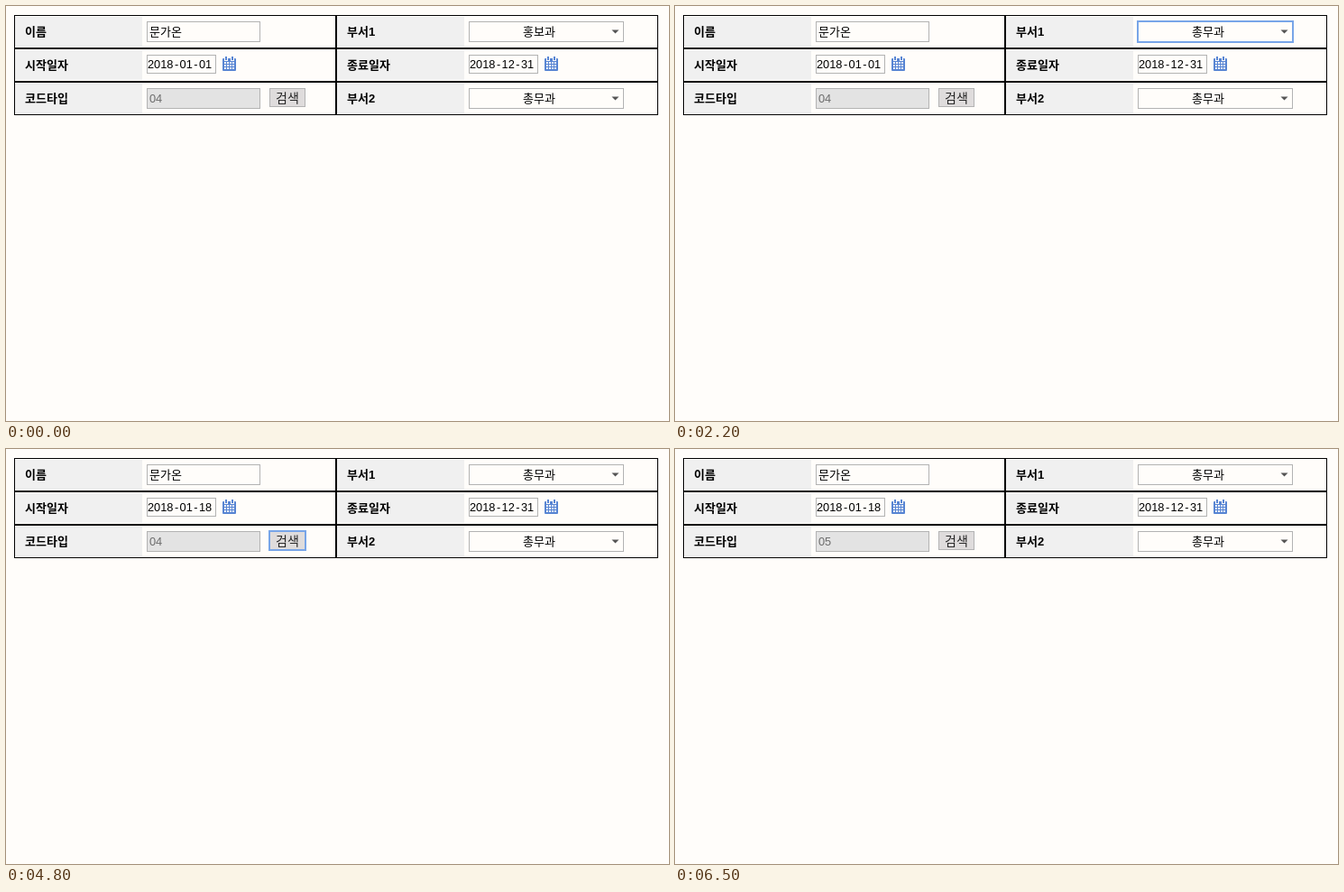
Recreate the animation shown at these times as an HTML page. Size 735x460 px, loop 9.3 s.

```html
<!DOCTYPE html>
<html lang="ko">
<head>
<meta charset="utf-8">
<title>검색 조건</title>
<style>
html, body { margin: 0; width: 100%; height: 100%; overflow: hidden; background: #fffdfa; }
svg { display: block; font: 13px "Liberation Sans", "Noto Sans CJK KR", "Noto Sans CJK", sans-serif; }
text { white-space: pre; }
.step { animation: 9300ms step-end infinite; }
</style>
</head>
<body>
<svg id="stage" width="735" height="460" viewBox="0 0 735 460"></svg>
<script>
const LOOP = 9300;
const PAPER = '#fffdfa', EDGE = '#b3b3b3', BLUE = '#5885d3', RING = '#78a5e8', HOVER = '#ebf3fb';
let rules = '', count = 0;

const fill = (x, y, w, h, color, extra = '') =>
  `<rect x="${x}" y="${y}" width="${w}" height="${h}" fill="${color}" ${extra}/>`;

// Outlined box; x, y, w, h are its outer edges
const box = (x, y, w, h, color = PAPER, edge = EDGE, line = 1, r = 0) =>
  fill(x + line / 2, y + line / 2, w - line, h - line, color,
    `stroke="${edge}" stroke-width="${line}" rx="${r}"`);

// Text placed by its vertical middle
const text = (x, mid, str, { size = 13, color = '#000', bold, center, font } = {}) => {
  const body = str.replace(/-(\d)/g, '<tspan dx=".11em .11em">-$1</tspan>');
  return `<text x="${x}" y="${mid + size * .36}" font-size="${size}" fill="${color}"` +
    (bold ? ' font-weight="700"' : '') + (center ? ' text-anchor="middle"' : '') +
    (font ? ` font-family="${font}"` : '') + `>${body}</text>`;
};

const arrow = (x, y, color = '#555') => `<path d="M${x - 4} ${y - 2}h8l-4 4z" fill="${color}"/>`;

// Group visible from on to off, given as on, off, on, off...
const show = (times, body) => {
  const name = 'show' + count++;
  const keys = times.map((t, i) => t < LOOP ? `${t / LOOP * 100}%{opacity:${1 - i % 2}}` : '');
  rules += `@keyframes ${name}{${times[0] ? '0%{opacity:0}' : ''}${keys.join('')}}`;
  return `<g class="step" style="animation-name:${name}">${body}</g>`;
};

const swap = (at, before, after) => show([0, at], before) + show([at, LOOP], after);

const icon = (x, color) => {
  let s = fill(x, 58, 15, 14, color, 'rx="1"');
  for (const dx of [3, 10]) s += fill(x + dx - 1, 57, 4, 4, PAPER) + fill(x + dx, 56, 2, 4, color);
  for (let i = 0; i < 12; i++) s += fill(x + 2 + i % 4 * 3, 62 + (i >> 2) * 3, 2, 2, PAPER);
  return s;
};

function form() {
  const dateStyle = { size: 12.8 }, middle = { center: true };
  let s = '';
  [['이름', '부서1'], ['시작일자', '종료일자'], ['코드타입', '부서2']].forEach((labels, row) =>
    labels.forEach((label, col) => {
      const x = 9 + col * 357, y = 10 + row * 37;
      s += box(x, y, 357, 37, PAPER, '#000') + fill(x + 1, y + 2, 141, 33, '#f0f0f0') +
        text(x + 12, y + 18.5, label, { bold: true });
    }));

  s += box(156, 17, 126, 23) + text(159, 28.5, '문가온');
  s += box(156, 54, 77, 21) + swap(4000,
    text(157, 64.5, '2018-01-01', dateStyle), text(157, 64.5, '2018-01-18', dateStyle));
  s += icon(240, BLUE);
  s += show([2900, 3200], box(238, 55, 18, 19, PAPER, RING) + icon(240, '#3c3c3c'));
  s += box(513, 54, 77, 21) + text(514, 64.5, '2018-12-31', dateStyle) + icon(597, BLUE);

  const gray = { size: 12.8, color: '#6d6d6d' };
  s += box(156, 91, 126, 23, '#e3e3e3') +
    swap(6400, text(159, 102.5, '04', gray), text(159, 102.5, '05', gray));
  const search = { size: 14, color: '#222', center: true };
  s += box(292, 91, 40, 21, '#dfdcdc') + show([4800, 4900], box(291, 90, 42, 23, '#dfdcdc', RING, 2)) +
    text(312, 102, '검색', search);

  s += box(513, 17, 172, 23) + show([200, 1500], fill(514, 18, 170, 21, HOVER));
  s += show([1100, 1200, 2200, 2800], box(512, 16, 174, 25, 'none', RING, 2));
  s += swap(2200, text(591, 28.5, '홍보과', middle), text(591, 28.5, '총무과', middle)) + arrow(675.5, 28.5);
  s += box(513, 91, 172, 23) + text(591, 102.5, '총무과', middle) + arrow(675.5, 102.5);
  return s;
}

function dropdown() {
  let s = box(512, 39, 174, 73, PAPER, RING, 2);
  s += show([1500, 1600, 1800, 2200], fill(514, 64, 170, 22, HOVER));
  s += show([1200, 1500, 1600, 1800], fill(514, 87, 170, 22, HOVER));
  ['인사과', '총무과', '홍보과'].forEach((name, i) => {
    if (i) s += fill(514, 40 + i * 23, 170, 1, '#b8b8b8');
    s += text(599, 52 + i * 23, name, { center: true });
  });
  return show([1200, 2200], s);
}

function cell(i, state) {
  const col = i % 7, x = 165 + col * 26.25, y = 129 + (i / 7 | 0) * 20;
  const inMonth = i > 0 && i < 32, day = i === 0 ? 31 : inMonth ? i : i - 31;
  const weekend = inMonth && col % 6 === 0;
  let color = !inMonth ? '#dcd9d6' : col === 0 ? '#c9243f' : col === 6 ? BLUE : '#000';
  let frame = box(x, y, 25, 18, PAPER, '#dedede', 1, 2);
  if (state === 'hover') frame = fill(x, y, 25, 18, BLUE, 'rx="2"');
  if (state === 'picked') frame = box(x - 1, y - 1, 27, 20, BLUE, '#a5c5f3', 2, 2);
  if (state) color = '#fff';
  return frame + text(x + 12.5, y + 8.7, String(day), { size: 12.5, color, center: true, bold: weekend });
}

function calendar() {
  let s = box(156, 80, 201, 196) + fill(157, 81, 199, 28, '#f9f8f7') +
    fill(157, 109, 199, 1, '#c4c4c4') + fill(157, 110, 199, 141, '#eaf1fa') + fill(157, 251, 199, 1, EDGE);
  [['«', 175], ['‹', 190], ['›', 322], ['»', 337]].forEach(([mark, x]) =>
    s += text(x, 94, mark, { center: true, color: '#444' }));
  s += box(198, 84, 66, 22) + text(203, 95, '2018년') + arrow(254.5, 95.5);
  s += box(265, 84, 50, 22) + text(273, 95, '1월') + arrow(305.5, 95.5);
  ['SUN', 'MON', 'TUE', 'WED', 'THU', 'FRI', 'SAT'].forEach((name, i) =>
    s += text(177 + i * 26.3, 119.5, name,
      { size: 7.5, center: true, color: i === 0 ? '#c9243f' : i === 6 ? '#238040' : '#444' }));
  for (let i = 0; i < 42; i++) s += cell(i);
  s += show([3100, 3900], cell(1, 'picked'));
  s += show([3300, 3400], cell(4, 'hover')) + show([3400, 3500], cell(12, 'hover')) +
    show([3500, 3600], cell(11, 'hover')) + show([3600, 3900], cell(18, 'hover')) +
    show([3900, 4000], cell(18, 'picked'));
  s += fill(161, 256, 35, 17, '#d0d0d0', 'rx="3"') + box(160, 255, 35, 17, '#fbfbfb', '#aaa', 1, 3) +
    text(177.5, 263.5, 'Today', { size: 10.5, color: '#666', center: true });
  const note = { size: 11.8, color: '#333' };
  s += swap(3900, text(201, 263.5, '2018-01-01', note), text(201, 263.5, '2018-01-18', note));
  return show([3100, 4000], s);
}

function grid() {
  const edges = [213, 273, 403, 464, 525, 666];
  const mids = [243.5, 338.5, 434, 495, 596];
  const names = ['직책', '직위', '직원구분', '종교', '최종학력', '시간외근무', '시간외결재상태', '우편번호화면도코드', '인력형태'];
  const codes = ['01', '02', '03', '04', '05', '06', '07', '10', '11'];
  let s = fill(213, 166, 453, 21, 'url(#head)');
  ['그룹코드', '그룹명', '코드순서', '사용여부', '비고'].forEach((label, i) =>
    s += text(mids[i], 176.5, label, { bold: true, center: true, color: '#222' }));
  names.forEach((name, r) => {
    const y = 188 + r * 21;
    s += fill(213, y, 453, 20, r % 2 ? '#f5f5f5' : PAPER);
    if (r === 4) s += show([5600, 6400], fill(213, y, 453, 20, HOVER));
    [codes[r], name, String(r + 1), '1', name].forEach((value, i) =>
      s += text(mids[i], y + 10, value, { center: true, size: i % 4 ? 13 : i ? 13 : 12.5 }));
  });
  for (let i = 0; i < 10; i++) s += fill(213, 187 + i * 21, 453, 1, EDGE);
  edges.slice(1).forEach(x => s += fill(x, 166, 1, 211, EDGE));
  s += fill(668, 166, 17, 214, '#f1f1f1') + fill(670, 183, 13, 78, '#c1c1c1') +
    '<path d="M672.5 177h8l-4-4z" fill="#a3a3a3"/>' + arrow(676.5, 371, '#505050');
  return s;
}

function popup() {
  let s = fill(0, 0, 735, 460, 'rgb(192 196 207)', 'opacity=".25"');
  s += box(199, 130, 500, 264, '#e2e2e2', '#b0b0b0') + fill(200, 131, 498, 24, 'url(#bar)') +
    box(202, 155, 494, 236, PAPER, '#bcbcbc');
  s += '<path d="M211 139l4.5 4-4.5 4z" fill="#111"/>' +
    text(226, 142.5, 'openPopup1', { size: 12, bold: true, color: '#222' });
  s += box(676, 136, 17, 16, '#fff', '#aaa', 1, 2) +
    '<path d="M681.3 140.8l6.8 6.8m0-6.8l-6.8 6.8" stroke="#111" stroke-width="2"/>';
  s += box(212, 165, 474, 216, PAPER, '#d5d5d5') + show([5100, 6400], grid());
  s += show([5900, 6400], box(212, 165, 474, 216, 'none', '#8fb5ee', 1.5, 2));
  const tip = fill(366, 298, 82, 19, '#000', 'opacity=".35"') + box(363, 295, 82, 20, '#fff', '#767676') +
    text(369, 304.5, 'openPopup1', { size: 11.5, color: '#575757', font: 'Open Sans, sans-serif' });
  s += show([6000, 6100], `<g opacity=".5">${tip}</g>`) + show([6100, 6400], tip);
  return show([4900, 6400], s);
}

const shade = (id, from, to) =>
  `<linearGradient id="${id}" x2="0" y2="1"><stop stop-color="${from}"/><stop offset="1" stop-color="${to}"/></linearGradient>`;

const scene = `<defs>${shade('bar', '#f6f6f6', '#dcdcdc')}${shade('head', '#fafafa', '#ececec')}</defs>` +
  form() + dropdown() + calendar() + popup();
document.head.appendChild(document.createElement('style')).textContent = rules;
document.getElementById('stage').innerHTML = scene;
</script>
</body>
</html>
```
